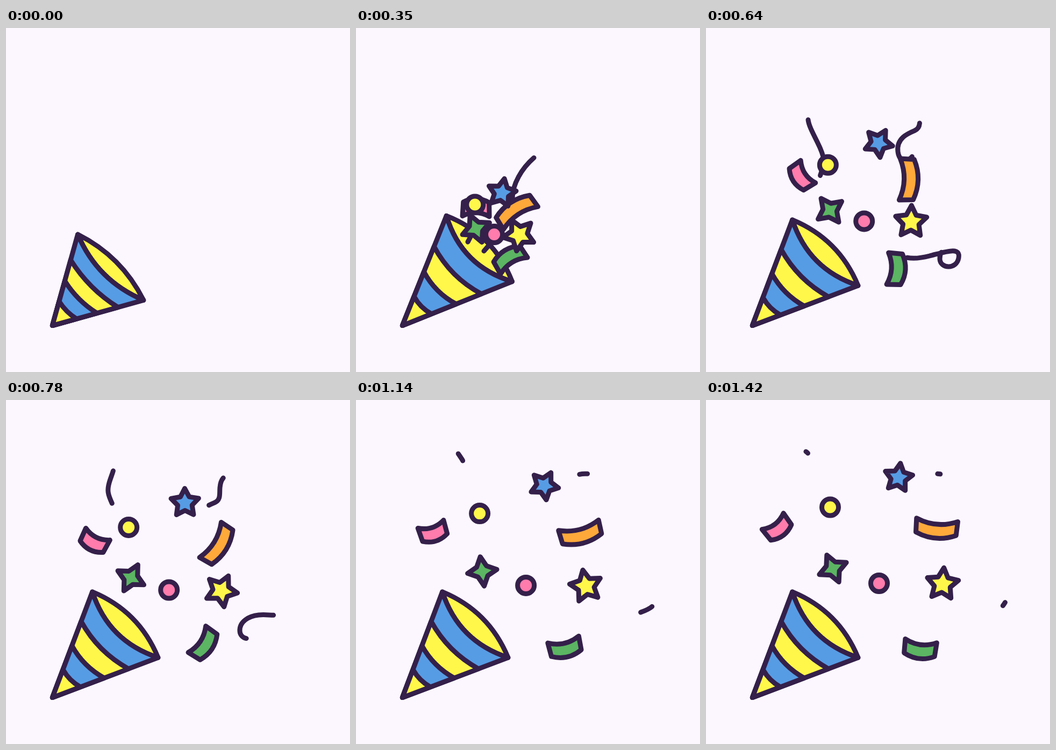
An HTML page with a canvas for the animation above (1.57 s loop, 640 px wide and 640 px high).

```html
<!DOCTYPE html>
<html lang="en">
<head>
<meta charset="utf-8">
<title>Party popper</title>
<style>
html, body { margin: 0; height: 100%; overflow: hidden; background: #fcf7ff; }
canvas { display: block; }
</style>
</head>
<body>
<canvas id="stage" width="640" height="640"></canvas>
<script>
const ctx = document.getElementById('stage').getContext('2d');
const INK = '#34204a', BLUE = '#569ce4', YELLOW = '#fff84a', PINK = '#ff7cac',
      GREEN = '#5bb562', ORANGE = '#ffa93b', PAPER = '#fcf7ff';
const LOOP = 1570, FPS = 14, LAST = 20, STROKE = 9;

const clamp = x => Math.min(1, Math.max(0, x));
const lerp = (a, b, p) => a + (b - a) * p;
const smooth = x => (x = clamp(x)) * x * (3 - 2 * x);

function paint(color) {
  ctx.fillStyle = color;
  ctx.fill();
  ctx.stroke();
}

// Piece shapes, drawn around the origin
const dot = () => ctx.arc(0, 0, 15.5, 0, 7);
const star = (tips, radius, inner) => () => {
  for (let i = 0; i < tips * 2; i++) {
    const a = i * Math.PI / tips, r = i % 2 ? inner : radius;
    ctx.lineTo(r * Math.sin(a), -r * Math.cos(a));
  }
  ctx.closePath();
};
const strip = length => () => {
  const x = length / 2, y = 13, sag = 8 + length / 9;
  ctx.moveTo(-x, -y);
  ctx.quadraticCurveTo(0, sag - y, x, -y);
  ctx.lineTo(x - 1, y);
  ctx.quadraticCurveTo(0, sag + y, 1 - x, y);
  ctx.closePath();
};

// Every piece flies from the mouth to (x, y), spinning by turn degrees to its final angle
const pieces = [
  { shape: strip(77), color: ORANGE, x: 429, y: 236, angle: 5, turn: 360 },
  { shape: strip(59), color: GREEN, x: 398.5, y: 461, angle: 7, turn: 360 },
  { shape: star(5, 30.5, 15.5), color: YELLOW, x: 440, y: 342.5, angle: 5, turn: 290 },
  { shape: star(5, 27, 14), color: BLUE, x: 358, y: 144.4, angle: 8, turn: -360 },
  { shape: star(4, 27.5, 13), color: GREEN, x: 236, y: 313.5, angle: -24, turn: -297 },
  { shape: strip(50), color: PINK, x: 132, y: 236, angle: -37, turn: -360, from: [248, 425], bow: [22, -14] },
  { shape: dot, color: YELLOW, x: 231, y: 199.5 },
  { shape: dot, color: PINK, x: 322, y: 341 }
];

function drawPiece({ shape, color, x, y, angle = 0, turn = 0, from = [215, 412], bow = [0, 0] }, p, scale) {
  const bend = 4 * p * (1 - p);
  ctx.save();
  ctx.translate(lerp(from[0], x, p) + bend * bow[0], lerp(from[1], y, p) + bend * bow[1]);
  ctx.rotate((angle - turn * (1 - p)) * Math.PI / 180);
  ctx.scale(scale, scale);
  ctx.lineWidth = STROKE / scale;
  ctx.beginPath();
  shape();
  paint(color);
  ctx.restore();
}

// Streamers run along a curve; rest is the share of it still ahead as they leave the mouth
function streamer(d, rest) {
  const path = document.createElementNS('http://www.w3.org/2000/svg', 'path');
  path.setAttribute('d', d);
  return { path: new Path2D(d), length: path.getTotalLength(), rest };
}
const streamers = [
  streamer('M208 398C222 372 230 354 219 322S208 288 214 270S224 246 207 212S187 172 192 154S206 124 197 110S188 97 184 95', 0.5),
  streamer('M238 415C265 385 291 350 291 317S318 246 350 228S389 222 386 234S360 255 357 230S376 196 388 191S397 175 398 163S403 133 437 138', 0.29),
  streamer('M247 437C273 407 306 405 340 417S385 432 416 424S474 406 470 428S436 448 435 430S452 402 470 400S505 404 527 396S552 385 558 374', 0.59)
];

function drawStreamer({ path, length, rest }, n) {
  const head = clamp(1 - rest * Math.exp(-0.33 * (n - 7)));
  const tail = clamp(1 - (rest + 0.1) * Math.exp(-0.3 * (n - 9)));
  if (head <= tail) return;
  ctx.setLineDash([(head - tail) * length, length * 2]);
  ctx.lineDashOffset = -tail * length;
  ctx.stroke(path);
}

// Cone space: u runs from the tip to the mouth, v across it
const LENGTH = 191.6, HALF = 86.5, RIM = 36, LIP = 44, BAND = 25;
const cone = (u, v) => [86.3 + (u + v) * Math.SQRT1_2, 553.6 + (v - u) * Math.SQRT1_2];

function drawMouth(stretch) {
  const u = LENGTH * stretch;
  ctx.beginPath();
  ctx.moveTo(...cone(u, -HALF));
  ctx.quadraticCurveTo(...cone(u + RIM * stretch, 0), ...cone(u, HALF));
  ctx.quadraticCurveTo(...cone(u - LIP * stretch, 0), ...cone(u, -HALF));
  ctx.closePath();
  paint(YELLOW);
}

// Each band covers the cone from the tip up to share q, larger ones first
function drawBody(stretch) {
  [1, 0.72, 0.49, 0.265].forEach((q, i) => {
    const u = LENGTH * stretch * q, depth = (i ? BAND * q : LIP) * stretch;
    ctx.beginPath();
    ctx.moveTo(...cone(0, 0));
    ctx.lineTo(...cone(u, -HALF * q));
    ctx.quadraticCurveTo(...cone(u - depth, 0), ...cone(u, HALF * q));
    ctx.closePath();
    paint(i % 2 ? YELLOW : BLUE);
  });
}

function render(n) {
  const stretch = n < 3 ? lerp(0.8, 1.086, smooth(n / 3)) : lerp(1.086, 1, smooth((n - 3) / 5));
  const t = clamp((n - 3.2) / (LAST - 3.2));
  const flight = 1 - (1 - t) / (1 + 4.4 * t);
  const scale = clamp((n - 1) / 2.7);

  ctx.fillStyle = PAPER;
  ctx.fillRect(0, 0, 640, 640);
  ctx.strokeStyle = INK;
  ctx.lineWidth = STROKE;
  ctx.lineCap = ctx.lineJoin = 'round';

  drawMouth(stretch);
  streamers.forEach(s => drawStreamer(s, n));
  ctx.setLineDash([]);
  if (scale > 0) pieces.forEach(piece => drawPiece(piece, flight, scale));
  drawBody(stretch);
}

// Stepped at 14 poses a second, each starting on a 10 ms tick; the last pose holds
function tick() {
  const ticks = Math.floor(performance.now() % LOOP / 10) + 1;
  render(Math.min(LAST, Math.ceil(ticks * FPS / 100 - 1e-9) - 1));
  requestAnimationFrame(tick);
}
tick();
</script>
</body>
</html>
```
